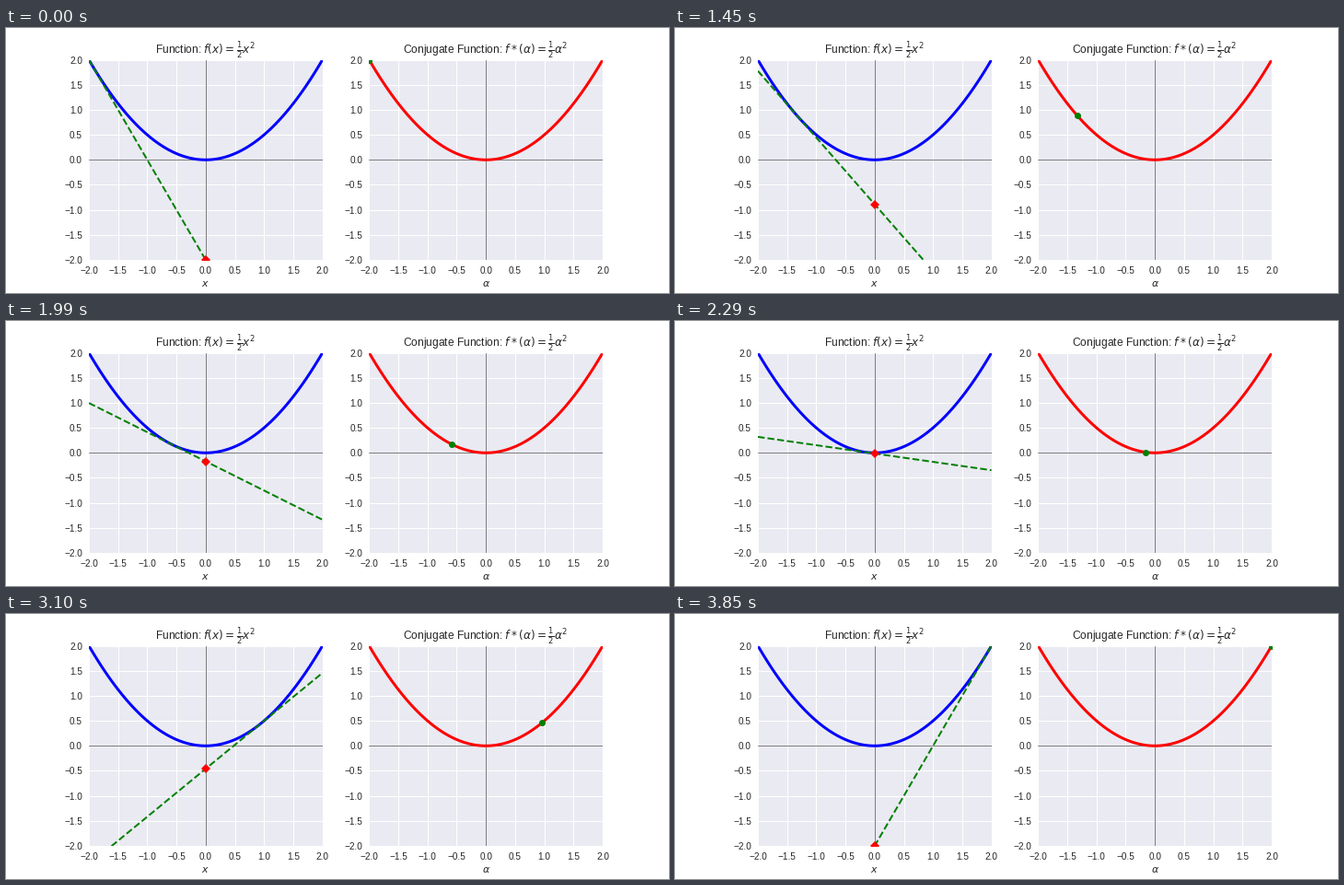
Recreate the animation shown at these times as a matplotlib script. Size 720x288 px, loop 4.85 s.

```python
import numpy as np
import matplotlib.pyplot as plt
from matplotlib.animation import FuncAnimation

plt.style.use("seaborn-v0_8")
plt.rcParams["font.sans-serif"] = ["Liberation Sans", "DejaVu Sans"]

TICK = 10      # ms per frame
LOOP = 4850    # ms per loop
HOLD = 1000    # pause at either end
STEP = 30      # ms between slopes
LIMIT = 2

slopes = np.linspace(-LIMIT, LIMIT, 97)
x = np.linspace(-LIMIT, LIMIT, 101)

fig, (left, right) = plt.subplots(1, 2, figsize=(10, 4), dpi=72)
fig.subplots_adjust(left=0.125, right=0.9, bottom=0.125, top=0.88, wspace=0.2)


def set_limits(ax):
    ax.set_xlim(-LIMIT, LIMIT)
    ax.set_ylim(-LIMIT, LIMIT)


def draw_parabola(ax, color, title, label):
    ax.axhline(0, color="gray", lw=1)
    ax.axvline(0, color="gray", lw=1)
    ax.plot(x, x**2 / 2, color=color, lw=3)
    ax.set_title(title)
    ax.set_xlabel(label)
    set_limits(ax)


draw_parabola(left, "blue", r"Function: $f(x)=\frac{1}{2}x^2$", r"$x$")
draw_parabola(right, "red",
              r"Conjugate Function: $f*(\alpha)=\frac{1}{2}\alpha^2$", r"$\alpha$")

# Keep the fixed parts as a backdrop so each frame only draws what moves.
fig.canvas.draw()
backdrop = np.array(fig.canvas.buffer_rgba())
for ax in (left, right):
    ax.clear()
    ax.axis("off")
    set_limits(ax)
fig.figimage(backdrop, zorder=-1)

tangent, = left.plot([], [], "--", color="green", lw=2)
intercept, = left.plot([], [], "D", color="red", ms=7)
point, = right.plot([], [], "o", color="green", ms=7)


def slope_at(ms):
    if ms < HOLD:
        return slopes[0]
    return slopes[min((ms - HOLD) // STEP + 1, len(slopes) - 1)]


def update(frame):
    a = slope_at(frame * TICK)
    conjugate = a**2 / 2
    tangent.set_data(x, a * x - conjugate)
    intercept.set_data([0], [-conjugate])
    point.set_data([a], [conjugate])
    return tangent, intercept, point


anim = FuncAnimation(fig, update, frames=LOOP // TICK, interval=TICK,
                     repeat=True, repeat_delay=0)
plt.show()
```
